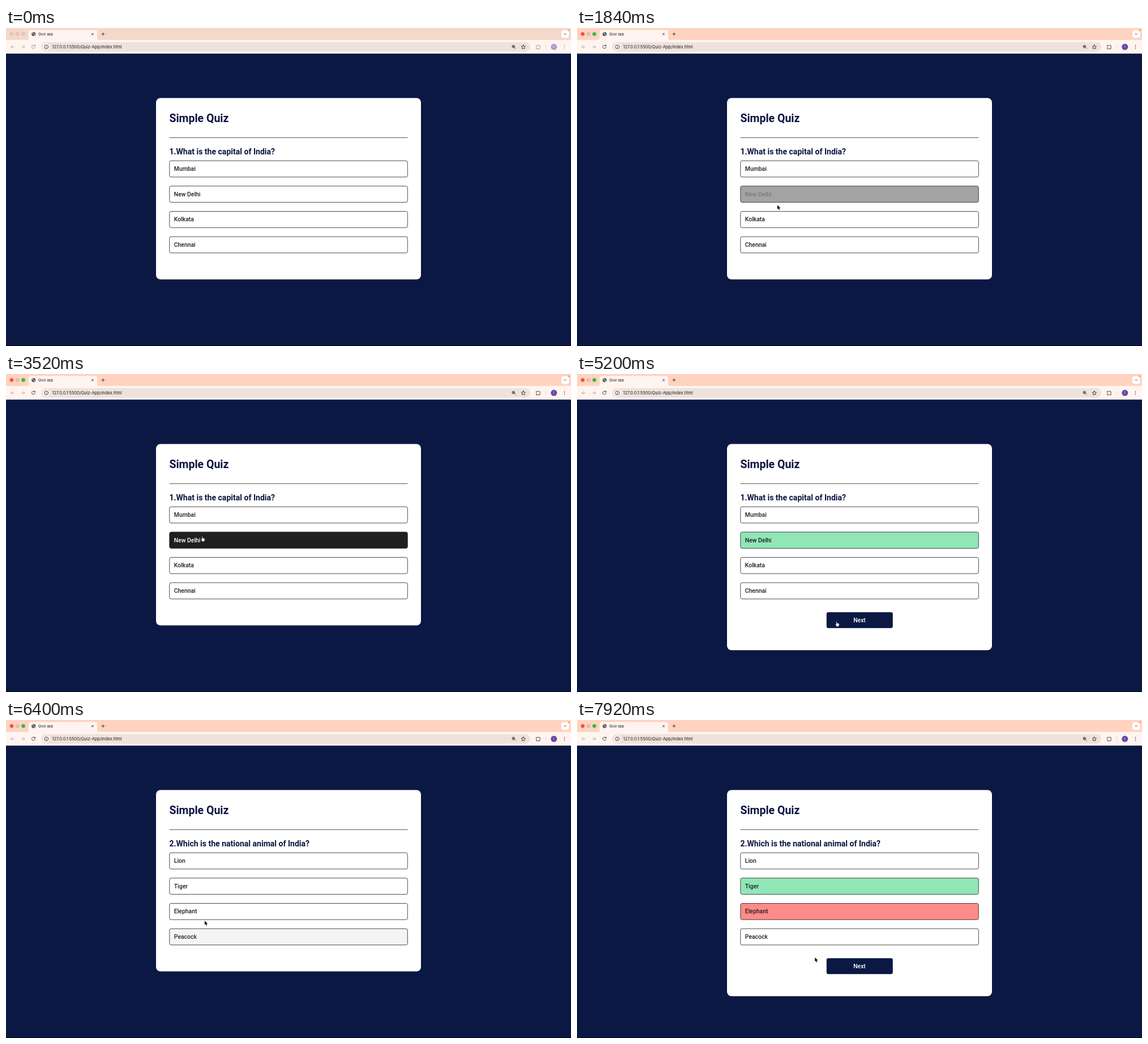
An HTML page for the animation above (8000 ms loop, 998x561 px).

```html
<!DOCTYPE html>
<html lang="en">
<head>
<meta charset="utf-8">
<title>Quiz app</title>
<style>
html, body { margin: 0; width: 100%; height: 100%; overflow: hidden; background: #0a1843; }
svg { display: block; width: 998px; height: 561px; }
text { white-space: pre; }
.page { font-family: Roboto, sans-serif; }
.ui { font-family: Inter, sans-serif; fill: #1f1d1c; }
.heading { font-weight: 700; fill: #0d143f; }
.line { fill: none; stroke: #37302d; stroke-width: .9; stroke-linecap: round; stroke-linejoin: round; }
.dim { stroke: #b3a6a0; }
</style>
</head>
<body>
<svg viewBox="0 0 998 561">
  <rect width="998" height="561" fill="#0a1843"/>
  <rect y="560" width="998" height="1" fill="#02081c"/>

  <rect id="strip" width="998" height="22"/>
  <g id="lights"></g>
  <path d="M37 21.500q3 0 3-4V7.500q0-4 4-4H157q4 0 4 4v10q0 4 3 4z" fill="#fff4f0"/>
  <rect y="21" width="998" height="24.200" fill="#fff4f0"/>
  <circle cx="48.700" cy="10.700" r="3.500" fill="#3f3f42"/>
  <path d="M46.200 9.200l2-1.300 1 1-1.500 1.600zM49.200 11l2-.6-.8 2.300-1.600.6zM46 11.200l1.400.8.2 1.400z" fill="#fff4f0"/>
  <text class="ui" x="57" y="12.900" font-size="6.240">Quiz app</text>
  <path class="line" d="M151.200 9.200l3.200 3.200m0-3.200l-3.200 3.200"/>
  <path class="line" d="M168.900 10.700h5m-2.500-2.500v5"/>
  <rect x="981" y="4" width="13.500" height="13.500" rx="4" fill="#fff"/>
  <path class="line" d="M985.900 9.900l1.800 1.800 1.800-1.800"/>
  <circle cx="994" cy="4" r="1.500" fill="#f79b57"/>

  <rect x="62" y="25" width="864" height="16.500" rx="8.250" fill="#efe1db"/>
  <path class="line dim" d="M14.500 33.300H8.800m2.700-2.700l-2.700 2.700 2.700 2.700M27.300 33.300H33m-2.700-2.700l2.700 2.700-2.700 2.700"/>
  <circle cx="71.200" cy="33.300" r="6.200" fill="#fff4f0"/>
  <circle class="line" cx="71.200" cy="33.300" r="3.500"/>
  <path class="line" d="M71.200 33v2M71.200 31.500v.01"/>
  <text class="ui" x="81.500" y="35.900" font-size="7.420">127.0.0.1:5500/Quiz-App/index.html</text>
  <circle class="line" cx="896.300" cy="32.600" r="2.300"/>
  <path class="line" d="M898.100 34.400l2 2M895.300 32.600h2m-1-1v2"/>
  <path class="line" d="M913.800 29.700l1.100 2.400 2.600.3-1.900 1.800.5 2.600-2.300-1.300-2.300 1.300.5-2.600-1.900-1.800 2.600-.3z"/>
  <g id="tools">
    <path class="line" d="M51.100 31.500a3 3 0 1 0 .3 2.500M51.400 30v1.900h-1.900"/>
    <path class="line" d="M936.800 30.800h2q.8-1.900 1.600 0h2.600v2.200q1.700.7 0 1.600v2.200h-6.200v-2.200q1.500-.8 0-1.600z"/>
    <path class="line" d="M986.500 30.500v.01M986.500 33.300v.01M986.500 36.100v.01" style="stroke-width:1.500"/>
    <circle cx="967.800" cy="33.300" r="5.500" fill="#6548a5"/>
    <text class="ui" x="967.800" y="35.400" font-size="5.500" text-anchor="middle" style="fill:#fff">I</text>
  </g>
  <path d="M953.700 29v8.500" stroke="#f6d3c5"/>

  <g class="page">
    <rect id="card" x="265" y="123.500" width="468" rx="7.800" fill="#fff"/>
    <text class="heading" x="288.400" y="165.700" font-size="19.500">Simple Quiz</text>
    <path d="M288.500 193.500h421" stroke="#333" stroke-width=".8"/>
    <text class="heading" id="ask" x="288.400" y="222.600" font-size="14.040"></text>
    <g id="options"></g>
    <g id="next">
      <rect x="440.800" y="420.200" width="117" height="28" rx="3.100" fill="#0a1843"/>
      <text x="499" y="438" font-size="10.400" font-weight="500" text-anchor="middle" fill="#fff">Next</text>
    </g>
  </g>

  <g id="pointer">
    <path id="arrow" d="M0 0V7.300L1.700 5.800 2.800 8.400 4.100 7.800 3 5.300H5.300Z" fill="#000" stroke="#fff" stroke-width=".6" paint-order="stroke"/>
    <path id="hand" d="M-.8.8Q-.8 0 0 0T.8.8V3Q1.700 2.400 2.300 3.200 3.200 2.700 3.700 3.600 4.700 3.300 4.700 4.400V6.400L3.800 8.200V9.300H-.4V8.300L-2.500 5.500Q-2.700 4.300-1.600 4.600L-.8 5.300Z" fill="#fff" stroke="#111" stroke-width=".8" stroke-linejoin="round"/>
  </g>
</svg>
<script>
const LOOP = 8000, STEP = 80, FADE = 300;
const FOCUS = 560, SHOW = 640;
const ROW = { x: 288.8, y: 234.2, w: 420.5, h: 28.7, gap: 44.65 };
const WHITE = [255, 255, 255], INK = [31, 31, 31], GREEN = [144, 230, 182], RED = [253, 139, 137];

const quiz = [
  { start: 0, click: 3840, pick: 1, right: 1, ask: '1.What is the capital of India?',
    options: ['Mumbai', 'New Delhi', 'Kolkata', 'Chennai'] },
  { start: 5440, click: 7280, pick: 2, right: 1, ask: '2.Which is the national animal of India?',
    options: ['Lion', 'Tiger', 'Elephant', 'Peacock'] }
];

// pointer moves: start time, end time, x, y; each one slows down at its end
const home = [60, 385];
const moves = [
  [SHOW, 1240, 352, 248],
  [1520, 1840, 354, 312.5],
  [1840, 2480, 345.8, 404.7],
  [2760, 2980, 347, 221],
  [2980, 3160, 346.5, 286.5],
  [4320, 4840, 650, 405],
  [4840, 5200, 458.5, 436.5],
  [5880, 6400, 351, 354.3],
  [6400, 6640, 348.5, 335],
  [7440, 7920, 420.3, 419]
];

const $ = id => document.getElementById(id);
const lerp = (a, b, k) => a + (b - a) * k;
const mix = (a, b, k) => a.map((v, i) => lerp(v, b[i], k));
const rgb = c => `rgb(${c.map(Math.round)})`;
const show = (el, on) => el.setAttribute('visibility', on ? 'visible' : 'hidden');
const quizAt = t => quiz[t < quiz[1].start ? 0 : 1];
const rowY = i => ROW.y + i * ROW.gap;

function add(parent, tag, attrs) {
  const el = document.createElementNS('http://www.w3.org/2000/svg', tag);
  for (const k in attrs) el.setAttribute(k, attrs[k]);
  return parent.appendChild(el);
}

// CSS "ease": cubic-bezier(.25, .1, .25, 1)
function ease(x) {
  if (x <= 0) return 0;
  if (x >= 1) return 1;
  let lo = 0, hi = 1, u;
  for (let i = 0; i < 20; i++) {
    u = (lo + hi) / 2;
    if (.75 * u * (1 - u) + u ** 3 < x) lo = u; else hi = u;
  }
  return .3 * u * (1 - u) ** 2 + 3 * u * u * (1 - u) + u ** 3;
}

function pointerAt(t) {
  let p = home;
  for (const [from, to, x, y] of moves) {
    if (t < from) break;
    const left = Math.max(0, (to - t) / (to - from));
    p = mix(p, [x, y], 1 - left * left);
  }
  return p;
}

function rowAt([x, y]) {
  if (x < ROW.x || x > ROW.x + ROW.w) return -1;
  return [0, 1, 2, 3].findIndex(i => y >= rowY(i) && y <= rowY(i) + ROW.h);
}

// moments when each option gains or loses its hover state
const hovers = [[], [], [], []];
for (let t = SHOW, last = -1; t < LOOP; t += 5) {
  const now = t < quizAt(t).click ? rowAt(pointerAt(t)) : -1;
  if (now === last) continue;
  if (last >= 0) hovers[last].push([t, 0]);
  if (now >= 0) hovers[now].push([t, 1]);
  last = now;
}

function hoverLevel(i, t) {
  let from = 0, to = 0, at = -FADE;
  for (const [time, goal] of hovers[i]) {
    if (time > t) break;
    from = lerp(from, to, ease((time - at) / FADE));
    to = goal;
    at = time;
  }
  return lerp(from, to, ease((t - at) / FADE));
}

const lights = ['#fb4b45', '#dcc3b8', '#27c138'].map((tint, i) => ({
  tint, el: add($('lights'), 'circle', { cx: 10 + i * 10.3, cy: 10.6, r: 3.2, stroke: '#0002', 'stroke-width': .5 })
}));
const rows = quiz[0].options.map((_, i) => ({
  box: add($('options'), 'rect', { x: ROW.x, y: rowY(i), width: ROW.w, height: ROW.h,
    rx: 3, stroke: '#2a2a2a', 'stroke-width': .85 }),
  label: add($('options'), 'text', { x: 296.8, y: rowY(i) + 17.8,
    'font-size': 10.4, 'font-weight': 500 })
}));

function drawWindow(active) {
  $('strip').setAttribute('fill', active ? '#ffd3bf' : '#f5d8c9');
  for (const { tint, el } of lights) el.setAttribute('fill', active ? tint : '#e2cabe');
  $('tools').setAttribute('opacity', active ? 1 : .5);
}

function drawRow(q, i, t) {
  const level = hoverLevel(i, t);
  let base = WHITE;
  if (t >= q.click && (i === q.right || i === q.pick)) {
    const tint = i === q.right ? GREEN : RED;
    base = i === q.pick ? tint : mix(WHITE, tint, ease((t - q.click) / FADE));
  }
  rows[i].box.setAttribute('fill', rgb(mix(base, INK, level)));
  rows[i].label.setAttribute('fill', rgb(mix(INK, WHITE, level)));
  rows[i].label.textContent = q.options[i];
}

// the hand stays after a click until the pointer moves again
function drawPointer(q, t) {
  const p = pointerAt(t), done = t >= q.click;
  const parked = String(p) === String(pointerAt(q.click));
  const onNext = done && Math.abs(p[0] - 499) < 59 && Math.abs(p[1] - 434) < 14;
  const hand = onNext || (rowAt(p) >= 0 && (!done || parked));
  $('pointer').setAttribute('transform', `translate(${p})`);
  show($('arrow'), t >= SHOW && !hand);
  show($('hand'), t >= SHOW && hand);
}

function draw(time) {
  const t = Math.floor(time % LOOP / STEP) * STEP;
  const q = quizAt(t), done = t >= q.click;
  drawWindow(t >= FOCUS);
  $('card').setAttribute('height', done ? 363.8 : 320.1);
  $('ask').textContent = q.ask;
  rows.forEach((_, i) => drawRow(q, i, t));
  show($('next'), done);
  drawPointer(q, t);
}

const begin = performance.now();
function tick() {
  draw(performance.now() - begin);
  requestAnimationFrame(tick);
}
tick();
</script>
</body>
</html>
```
